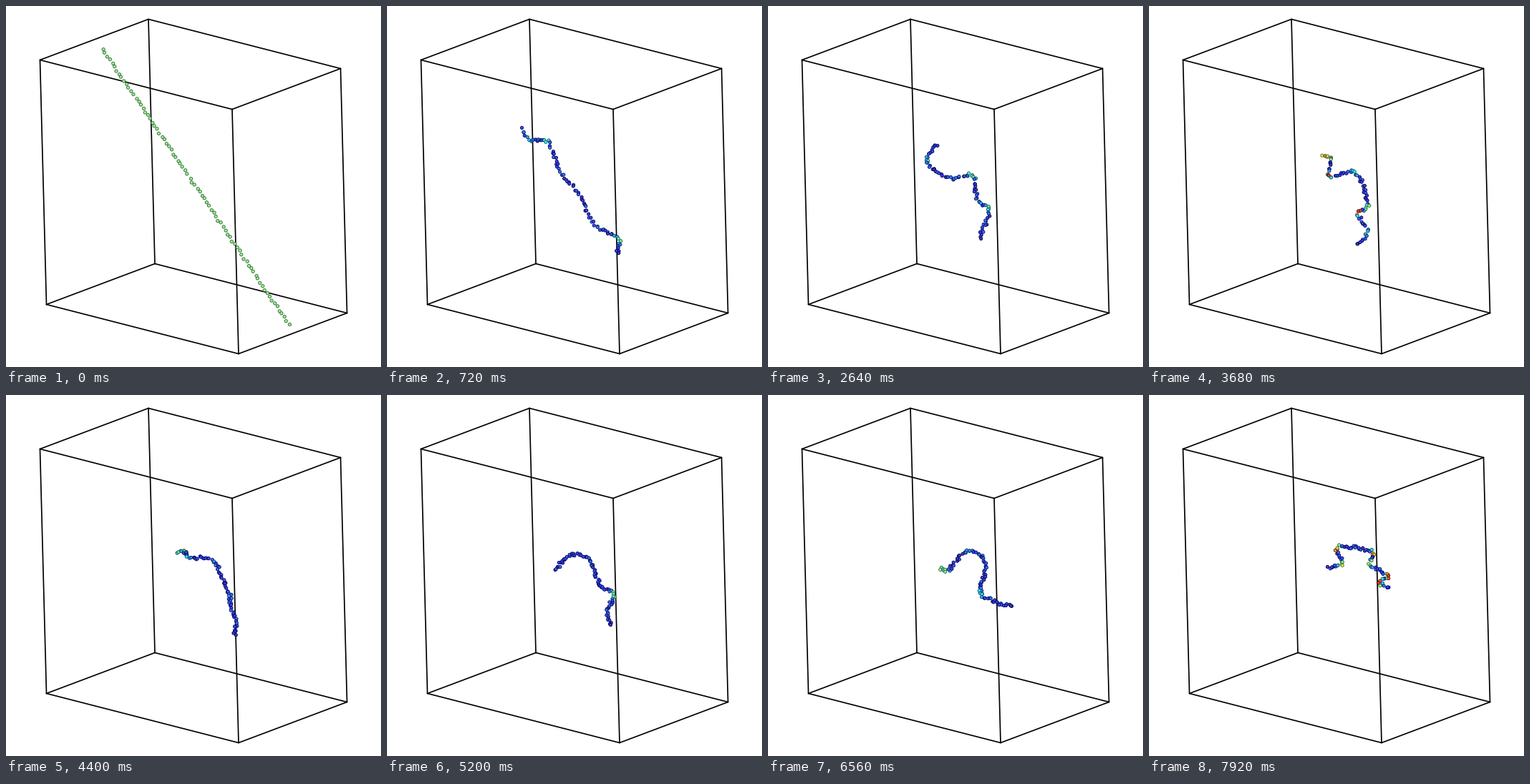
Animation, 524 px wide and 505 px high, one loop 8000 ms. Source, as a matplotlib script:

```python
import numpy as np
import matplotlib.pyplot as plt
from matplotlib.animation import FuncAnimation

W, H, DPI = 524, 505, 100
FRAMES, INTERVAL = 100, 80
BEADS = 80
PX = 72 / DPI
REACH = 4  # beads on each side used to measure bending

# Outline of the chain at a few moments; splines and noise fill in the rest.
KEYS = {
    0: [(135, 60), (395, 445)],
    18: [(204, 206), (214, 217), (235, 203), (243, 238), (265, 260),
         (280, 295), (309, 300), (300, 317)],
    33: [(235, 193), (221, 217), (254, 240), (285, 236), (292, 270),
         (308, 282), (305, 300), (295, 325)],
    46: [(243, 208), (255, 212), (251, 239), (289, 233), (305, 280),
         (291, 288), (305, 315), (291, 334)],
    65: [(235, 244), (256, 223), (282, 230), (298, 266), (316, 279),
         (308, 301), (312, 322)],
    82: [(240, 241), (251, 244), (280, 217), (304, 238), (296, 276),
         (317, 288), (340, 295)],
    99: [(250, 241), (270, 235), (263, 212), (312, 219), (309, 236),
         (334, 252), (322, 261), (335, 269)],
}

rng = np.random.default_rng(7)
s = np.linspace(0, 1, BEADS)
speckle = rng.uniform(0.8, 1.2, BEADS)
base_heat = rng.uniform(0.03, 0.2, BEADS)
phase = rng.uniform(0, 2 * np.pi, (2, BEADS, 2))
rate = rng.uniform(0.3, 1.4, (2, BEADS, 2))

# Between key moments the head lifts and the tail swings out to the right.
sway = np.outer((1 - s) ** 2, (0, -6)) + np.outer(s ** 2, (18, 7))


def spread_beads(points):
    """Space the beads evenly along a smooth curve through the points."""
    p = np.array(points, float)
    slope = np.gradient(p, axis=0)
    t = np.linspace(0, len(p) - 1, 300)
    i = np.minimum(t.astype(int), len(p) - 2)
    u = (t - i)[:, None]
    path = ((1 + 2 * u) * (1 - u) ** 2 * p[i] + u * (1 - u) ** 2 * slope[i]
            + u ** 2 * (3 - 2 * u) * p[i + 1] - u ** 2 * (1 - u) * slope[i + 1])
    arc = np.r_[0, np.cumsum(np.hypot(*np.diff(path, axis=0).T))]
    return np.column_stack([np.interp(s * arc[-1], arc, c) for c in path.T])


times = list(KEYS)
shapes = [spread_beads(points) for points in KEYS.values()]


def bending(xy):
    """Angle by which the chain turns at each bead."""
    step = xy[REACH:] - xy[:-REACH]
    angle = np.unwrap(np.arctan2(step[:, 1], step[:, 0]))
    turn = np.abs(angle[REACH:] - angle[:-REACH])
    return np.pad(turn, REACH, mode="edge")


def chain_at(frame):
    i = min(np.searchsorted(times, frame, side="right") - 1, len(times) - 2)
    u = (frame - times[i]) / (times[i + 1] - times[i])
    drift = sway * np.sin(np.pi * u)
    if i == 0:  # the stretched chain snaps back quickly
        u = (1 - np.exp(-2.4 * u)) / (1 - np.exp(-2.4))
        drift = 0
    xy = shapes[i] + (shapes[i + 1] - shapes[i]) * u + drift
    bent = np.clip(base_heat + 0.28 * speckle * bending(xy) ** 2, 0, 0.92)
    settled = min(frame / 4, 1)
    heat = 0.5 + (bent - 0.5) * settled
    jitter = np.sin(rate * frame + phase).sum(axis=0)
    return xy + 0.5 + (0.7 + 0.5 * settled) * jitter, heat


fig = plt.figure(figsize=(W / DPI, H / DPI), dpi=DPI, facecolor="white")
ax = fig.add_axes([0, 0, 1, 1])
ax.set(xlim=(0, W), ylim=(H, 0))
ax.axis("off")

# Box as a parallel projection: one corner and three edge vectors.
corner = np.array([199, 18.5])
edges = np.array([(268.5, 69), (-151.5, 57), (9, 342)])
for axis in range(3):
    a, b = np.delete(edges, axis, axis=0)
    for p, q in np.ndindex(2, 2):
        start = corner + p * a + q * b
        ax.plot(*zip(start, start + edges[axis]), color="black",
                lw=1.7 * PX, solid_capstyle="round", zorder=1)

beads = ax.scatter(s, s, s=(4.2 * PX) ** 2, linewidths=0.9 * PX, zorder=2)


def update(frame):
    xy, heat = chain_at(frame)
    color = plt.cm.jet(heat)[:, :3]
    beads.set_offsets(xy)
    beads.set_facecolor(0.75 * color + 0.25)
    beads.set_edgecolor(0.4 * color)
    return beads,


anim = FuncAnimation(fig, update, frames=FRAMES, interval=INTERVAL,
                     repeat=True, repeat_delay=0)
plt.show()
```
